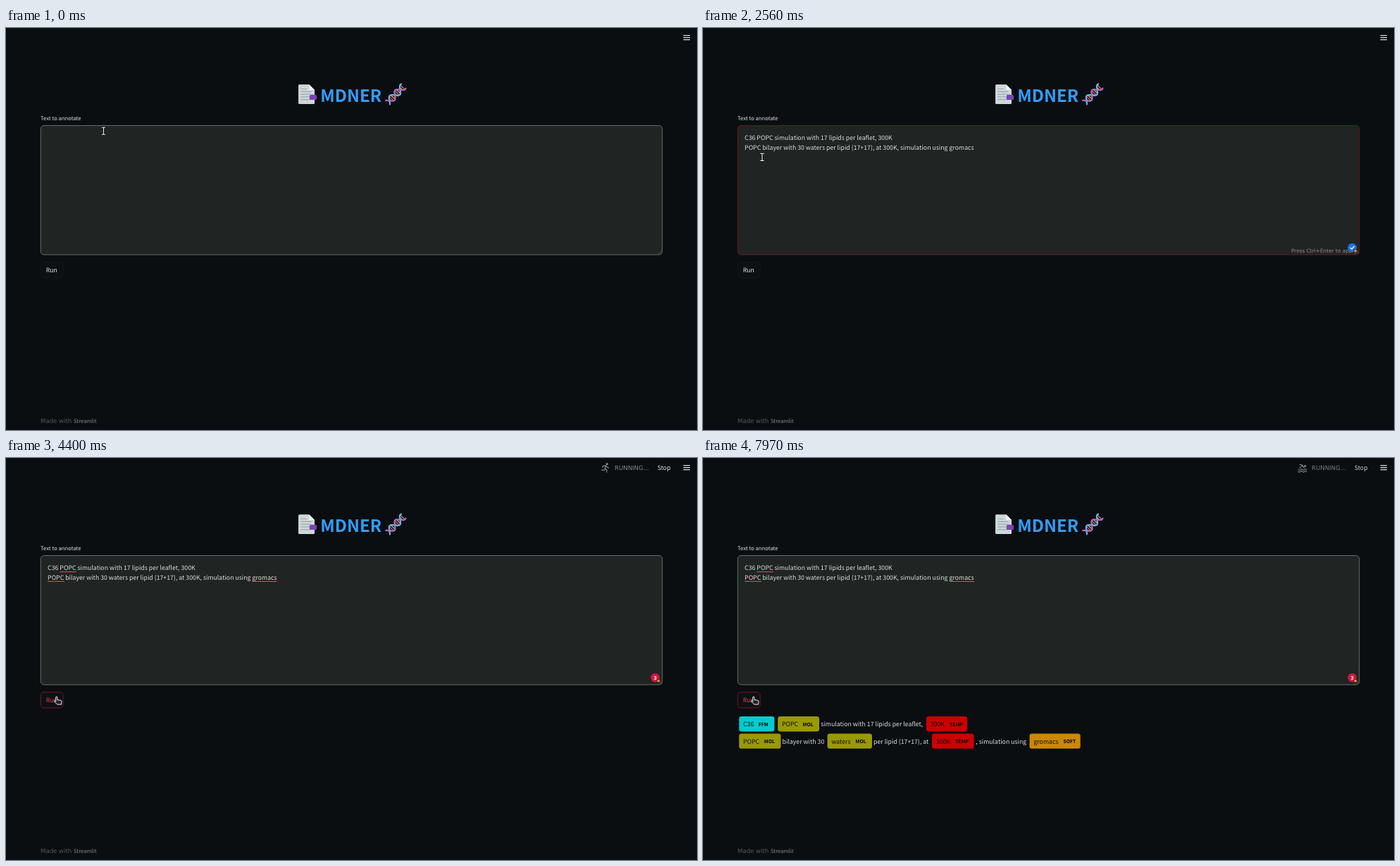
An HTML page that plays this animation: 981x571 px, repeating every 8000 ms.

```html
<!DOCTYPE html>
<html lang="en">
<head>
<meta charset="utf-8">
<title>MDNER</title>
<style>
  html, body { margin: 0; width: 100%; height: 100%; overflow: hidden; background: #0a0e11; }
  svg { display: block; width: 100vw; height: 100vh; }
  text { font: 8.76px "Noto Sans CJK JP", "Noto Sans CJK SC", "Noto Sans CJK", sans-serif;
         fill: #dcdedd; white-space: pre; text-rendering: geometricPrecision; }
  .small { font-size: 7.66px; }
  .title { font-size: 24.1px; font-weight: 700; fill: #329dfa; }
  .wide { font: 8.58px "DejaVu Sans", sans-serif; }
  .hint { font: 7.36px "DejaVu Sans", sans-serif; fill: #8b8e8c; }
  .tag text { fill: #0a0e11; }
  .tag .kind { font-size: 6.9px; font-weight: 700; fill: #000; }
  .line { fill: none; stroke-linecap: round; stroke-linejoin: round; }
</style>
</head>
<body>
<svg viewBox="0 0 981 571">
  <path d="M961.6 10.6h9.4M961.6 13.6h9.4M961.6 16.6h9.4" stroke="#d5d7d8" stroke-width="1.2"/>

  <g id="status">
    <g id="icon" class="line" transform="translate(843 6)" stroke="#85888a" stroke-width="1.25"></g>
    <text class="wide" x="864" y="16.8" style="fill:#85888a">RUNNING...</text>
    <text x="924.7" y="17">Stop</text>
  </g>

  <!-- page emoji -->
  <path d="M416.5 80.3h13.8l7.8 7.8v18.4q0 1.5-1.5 1.5h-20q-1.5 0-1.5-1.5v-24.7q0-1.5 1.4-1.5z" fill="#cfd8d9"/>
  <path d="M430.3 80.3l7.8 7.8h-6.3q-1.5 0-1.5-1.5z" fill="#eef3f3"/>
  <path d="M418.5 86.5h8.5M418.5 90.3h15M418.5 94.1h15M418.5 97.9h12M418.5 101.7h15" stroke="#9aa9ad" stroke-width="1.2"/>
  <rect x="430.8" y="94.8" width="10.4" height="7.2" rx="2.6" fill="#7a43b6"/>
  <text class="title" x="446.2" y="104.7">MDNER</text>
  <g id="dna" class="line" transform="translate(553.2 94.2) rotate(-46)" stroke-width="2.2"></g>

  <text class="small" x="49" y="131.4">Text to annotate</text>
  <rect id="area" x="49.3" y="138.6" width="882.4" height="183.4" rx="4.6" fill="#202423"/>
  <path d="M926.5 320.5l4-4M929 320.8l1.6-1.6" stroke="#606462" stroke-width=".8"/>
  <g id="typed">
    <text x="59.1" y="159">C36 POPC simulation with 17 lipids per leaflet, 300K</text>
    <text x="59.1" y="172.7">POPC bilayer with 30 waters per lipid (17+17), at 300K, simulation using gromacs</text>
  </g>
  <path id="spelling" d="M76.3 161.7h23.6M59 175.4h23.8M349.5 175.4h35.5" stroke="#d2404a" stroke-width="1.3"/>
  <path id="caret" stroke="#e4e6e5" stroke-width=".9"/>
  <text id="hint" class="hint" x="835" y="319.4">Press Ctrl+Enter to apply</text>
  <g id="badge">
    <circle id="disc" cx="921.7" cy="312" r="6.3"/>
    <path id="check" class="line" d="M919.2 312.2l1.9 1.9 3.3-3.8" stroke="#fff" stroke-width="1.3"/>
    <text id="count" x="921.7" y="314.7" text-anchor="middle" style="font:700 7.4px Roboto,sans-serif;fill:#fff">3</text>
    <circle cx="926.2" cy="316.6" r="2.4" fill="#e8863c" stroke="#202423" stroke-width=".9"/>
  </g>

  <rect id="button" x="49.3" y="332.7" width="31.8" height="22.2" rx="4.6"/>
  <text id="run" x="56.7" y="347.4">Run</text>
  <g id="results"></g>

  <text class="wide" x="49" y="561.4" style="fill:#55585b">Made with</text>
  <text class="small" x="95.9" y="561.4" style="fill:#85888b">Streamlit</text>

  <g id="beam" class="line">
    <path id="beamShape" d="M-2.2-5h1.6q.6 0 .6.6v8.8q0 .6-.6.6h-1.6M2.2-5H.6Q0-5 0-4.4M0 4.4q0 .6.6.6h1.6" stroke="#101313" stroke-width="2.6"/>
    <use href="#beamShape"/>
    <path d="M-2.2-5h1.6q.6 0 .6.6v8.8q0 .6-.6.6h-1.6M2.2-5H.6Q0-5 0-4.4M0 4.4q0 .6.6.6h1.6" stroke="#f2f2f2" stroke-width="1.1"/>
  </g>
  <path id="hand" d="M-2.3 1.5v-6q0-1.1 1.1-1.1t1.1 1.1v3.4l5 .9q1.2.3 1.1 1.5l-.5 4.3h-5.6l-4.4-4.2q-.5-1.1.6-1.4z"
        fill="#22272a" stroke="#eceded" stroke-width="1" stroke-linejoin="round"/>
</svg>
<script>
const LOOP = 8000;
const el = Object.fromEntries([...document.querySelectorAll("[id]")].map(e => [e.id, e]));
const show = (e, on) => e.setAttribute("visibility", on ? "visible" : "hidden");
const set = (e, attrs) => Object.entries(attrs).forEach(([k, v]) => e.setAttribute(k, v));

// DNA emoji: two opposed waves joined by rungs
const wave = (x, sign) => sign * 4.8 * Math.sin(x * 0.29 + 0.5);
const strand = sign => {
  let d = "";
  for (let x = -16; x <= 16; x++) d += (d ? "L" : "M") + x + " " + wave(x, sign).toFixed(2);
  return d;
};
let rungs = "";
for (let x = -14; x <= 14; x += 2.8)
  rungs += `<path d="M${x} ${wave(x, 1)}V${wave(x, -1)}" stroke="${["#e9b44c", "#e0705f"][Math.round(x / 2.8) & 1]}" stroke-width="1.3"/>`;
el.dna.innerHTML = rungs + `<path d="${strand(1)}" stroke="#62b5e4"/><path d="${strand(-1)}" stroke="#a768cc"/>`;

// Annotated result lines
const tag = (x, y, w, color, word, kindX, kind) =>
  `<g class="tag"><rect x="${x}" y="${y - 10.7}" width="${w}" height="21.4" rx="3.4" fill="${color}"/>` +
  `<text x="${x + 5.8}" y="${y + 3.4}">${word}</text><text class="kind" x="${kindX}" y="${y + 3.1}">${kind}</text></g>`;
const plain = (x, y, words) => `<text x="${x}" y="${y + 3.4}">${words}</text>`;
const OLIVE = "#999900", RED = "#cc0000";
el.results.innerHTML =
  tag(51.2, 377.8, 50.2, "#00cccc", "C36", 78.8, "FFM") +
  tag(106.2, 377.8, 58.8, OLIVE, "POPC", 141.6, "MOL") +
  plain(167.3, 377.8, "simulation with 17 lipids per leaflet,") +
  tag(317, 377.8, 58.2, RED, "300K", 349.9, "TEMP") +
  tag(51.2, 402.1, 59.3, OLIVE, "POPC", 86.8, "MOL") +
  plain(112.6, 402.1, "bilayer with 30") +
  tag(176.6, 402.1, 63.4, OLIVE, "waters", 216.5, "MOL") +
  plain(242, 402.1, "per lipid (17+17), at") +
  tag(325, 402.1, 59.6, RED, "300K", 358, "TEMP") +
  plain(387.3, 402.1, ", simulation using") +
  tag(463.6, 402.1, 72.2, "#cc8800", "gromacs", 511.4, "SOFT");

// Sports shown while the app is busy
const head = (x, y) => `<circle cx="${x}" cy="${y}" r="1" fill="#85888a"/>`;
const stroke = d => `<path d="${d}"/>`;
const waves = "M2.2 10.6q1.4 1.4 2.9 0t2.9 0 2.9 0 2.9 0M2.2 13.4q1.4 1.4 2.9 0t2.9 0 2.9 0 2.9 0";
const wheels = '<circle cx="4" cy="11.2" r="2.5"/><circle cx="12" cy="11.2" r="2.5"/>';
const icons = [
  head(10.2, 2.6) + stroke("M4.2 7.2V5.6L8.4 4.6l1.8 2.6 2.4.8M8.4 4.8L7.4 9l2.4 1.8v3.4M7.3 9.4l-.8 2.2-3.6-.7"),
  head(11.8, 5.4) + stroke("M4.4 3.4l3.2.4 2.8 4.4M7.8 4.4L4 8.2") + stroke(waves),
  head(10, 2.6) + wheels + stroke("M8 12V9.4L5.8 7.6 8.4 5l1.6 1.8h2.2"),
  head(9.4, 2.8) + stroke("M4.4 6.4l4-1.4 3.6 2M8.4 5L7 9l3 1.6-.6 2.4M7 9l-2.4 4M3 13.6h10"),
  head(8, 3) + stroke("M7.6 5L6.4 8.6h3.8l1.6-1.4M8 5.6l4 1.4M3 6l9 4.4") + stroke(waves),
  head(10.6, 3) + stroke("M9.4 5L6.4 8.4 9 10.4l-1.6 3M9 5.6l1.4 2.4h2.4M2.4 11l11 3.6")
];

const CYCLES = [4400, 5510, 6680, 7810];
function iconAt(t) {
  const start = CYCLES.filter(s => s <= t).pop();
  return start ? Math.min(5, Math.floor((t - start + 35) / 195)) : 5;
}

// Pointer stops: time, x, y
const PATH = [[70, 138.5, 146.3], [520, 87, 152.6], [1860, 87, 152.6], [2560, 84, 183.4],
              [2870, 84, 186], [3480, 73, 344.5], [LOOP, 73, 344.5]];
function pointerAt(t) {
  const i = PATH.findIndex(p => p[0] > t);
  if (i < 1) return PATH[0].slice(1);
  const [t0, x0, y0] = PATH[i - 1], [t1, x1, y1] = PATH[i];
  const u = (t - t0) / (t1 - t0), k = u * u * (3 - 2 * u);
  return [x0 + (x1 - x0) * k, y0 + (y1 - y0) * k];
}

let lastIcon = -1;
function draw(t) {
  const within = (a, b) => t >= a && t < b;
  const pasted = t >= 2020, checked = t >= 3030;
  const [x, y] = pointerAt(t);
  const onButton = y > 330, pressed = within(3660, 3860);

  el.area.setAttribute("stroke", within(600, 3980) ? "#6d1a1c" : "#6a6e6b");
  show(el.typed, pasted);
  show(el.spelling, checked);
  show(el.hint, pasted && t < 3660);
  show(el.caret, within(600, 2420) || within(2950, 3480));
  el.caret.setAttribute("d", pasted ? "M385.4 162.8v12.4" : "M59.6 149.2v12.4");

  show(el.badge, t >= 690);
  el.disc.setAttribute("fill", checked ? "#d3173f" : "#1a73e8");
  el.check.style.display = checked ? "none" : "";
  el.count.style.display = checked ? "" : "none";

  set(el.button, {
    fill: pressed ? "#a30007" : "#0c1014",
    stroke: pressed ? "#a30007" : onButton ? "#7c1420" : "#14181c"
  });
  el.run.style.fill = onButton && !pressed ? "#e24a4f" : "#e4e6e5";

  show(el.status, t >= 3980);
  el.status.setAttribute("opacity", t >= 7970 ? 0.9 : Math.min(1, 0.35 + Math.max(0, t - 3980) / 230));
  const icon = iconAt(t);
  if (icon !== lastIcon) el.icon.innerHTML = icons[lastIcon = icon];
  show(el.results, t >= 7970);

  show(el.beam, !onButton);
  show(el.hand, onButton);
  (onButton ? el.hand : el.beam).setAttribute("transform", `translate(${x} ${y})`);
}

function tick() {
  draw(performance.now() % LOOP);
  requestAnimationFrame(tick);
}
tick();
</script>
</body>
</html>
```
